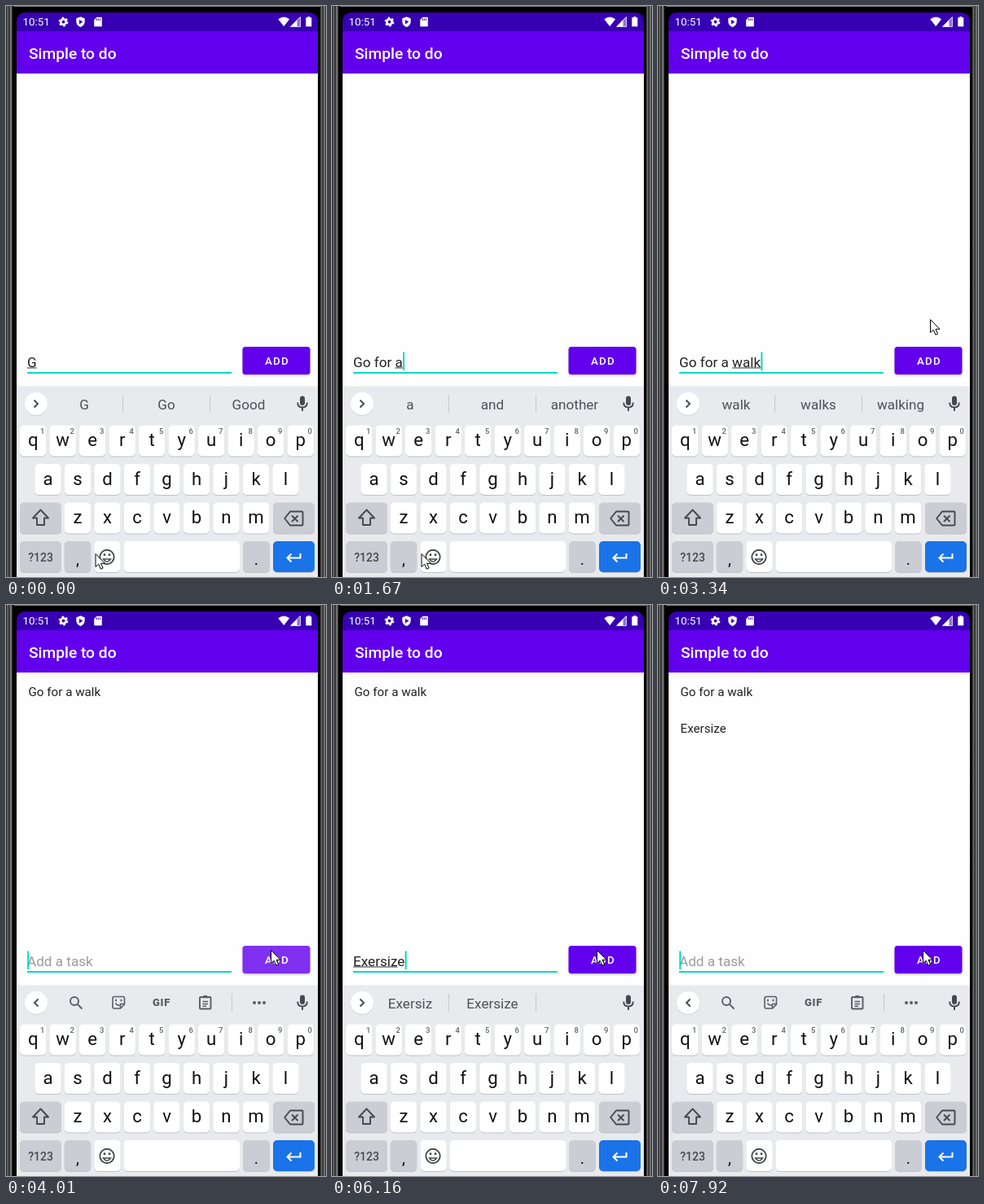
Recreate the animation shown at these times as an HTML page. Size 393 by 702 pixels, loop 8000 ms.

```html
<!DOCTYPE html>
<html lang="en">
<head>
<meta charset="utf-8">
<title>To-do list</title>
<style>
html, body { margin: 0; width: 100%; height: 100%; overflow: hidden; background: #000; }
svg { display: block; width: 100vw; height: 100vh; font-family: Roboto, sans-serif; }
text { white-space: pre; }
.icon { fill: none; stroke: #45494d; stroke-width: 1.9; }
.mid { text-anchor: middle; }
.tool { stroke: #5a5e63; }
</style>
</head>
<body>
<svg viewBox="0 0 393 702" preserveAspectRatio="none">
  <defs>
    <linearGradient id="rim">
      <stop offset="0" stop-color="#161616"/>
      <stop offset=".3" stop-color="#777"/>
      <stop offset=".45" stop-color="#1c1c1c"/>
      <stop offset=".75" stop-color="#8a8a8a"/>
      <stop offset="1" stop-color="#111"/>
    </linearGradient>
    <filter id="blur" x="-20%" y="-40%" width="140%" height="190%"><feGaussianBlur stdDeviation="1.6"/></filter>
  </defs>

  <rect width="393" height="702"/>
  <rect width="8" height="702" fill="url(#rim)"/>
  <rect x="385.5" width="7.5" height="702" fill="url(#rim)"/>
  <rect x="10" width="376" height="1" fill="#777"/>
  <path d="M13 83V20Q13 8 25 8H371Q383 8 383 20V83Z" fill="#3700b3"/>
  <rect x="13" y="31" width="370" height="52" fill="#6200ee"/>
  <rect x="13" y="83" width="370" height="385" fill="#fefefe"/>
  <rect x="13" y="467.5" width="370" height="235" fill="#e8eaed"/>

  <g fill="#fff">
    <text x="20.5" y="24.3" font-size="13.4">10:51</text>
    <circle cx="70.5" cy="19.5" r="3.2" fill="none" stroke="#fff" stroke-width="2.6"/>
    <circle cx="70.5" cy="19.5" r="5" fill="none" stroke="#fff" stroke-width="1.8" stroke-dasharray="2.6 2.636"/>
    <path d="M91.5 13.2l5.2 2v4q0 4.4-5.2 6.8q-5.200-2.400-5.200-6.800v-4z"/>
    <path d="M90 16.800v5.600l4.300-2.800z" fill="#3700b3"/>
    <path d="M111.500 13.700h5.500q.8 0 .8.8v10q0 .8-.8.800h-8q-.8 0-.8-.8v-7.500z"/>
    <path d="M111.500 15.500v2.300M113.500 15.500v2.300M115.500 15.500v2.300" stroke="#3700b3"/>
    <path d="M334.300 16.300q6.900-5.800 13.800 0L341.200 25z"/>
    <path d="M361 13.600v11.400h-11.400z" fill="#8c70d4"/>
    <path d="M357.500 17.100v7.900h-7.900z"/>
    <path d="M361.500 13.500v12h-12z" fill="none" stroke="#fff" stroke-width=".8"/>
    <path d="M370.300 13h3v1.300h2v11h-7v-11h2z"/>
    <text x="28" y="64.700" font-size="19.200" font-weight="500">Simple to do</text>
  </g>

  <g font-size="15.200" fill="#212121">
    <text x="27.500" y="112">Go for a walk</text>
    <text x="27.500" y="157.200">Exersize</text>
  </g>

  <g font-size="17.150">
    <text id="hint" x="26" y="443.500" fill="#9b9b9b">Add a task</text>
    <text id="field" x="26" y="443.500" fill="#212121"></text>
  </g>
  <rect id="under" y="444.400" height="1.100" fill="#444"/>
  <rect x="26" y="450" width="251" height="2" fill="#03dac5"/>
  <rect id="caret" y="425.500" width="2" height="22.500" fill="#03dac5"/>

  <rect id="shadow" x="291" width="82" height="34" rx="3" filter="url(#blur)"/>
  <rect id="button" x="290.500" y="419" width="83" height="34" rx="3.500"/>
  <text x="318" y="441" font-size="13.300" font-weight="500" letter-spacing="1.200" fill="#fff">ADD</text>

  <circle cx="37" cy="490" r="14" fill="#cfd2d6"/>
  <circle cx="37" cy="489" r="14" fill="#fff"/>
  <path id="chevron" class="icon"/>
  <g id="words" class="mid" font-size="17.100" fill="#4d5156">
    <text x="96" y="495.500"></text><text x="197" y="495.500"></text><text x="298" y="495.500"></text>
  </g>
  <path id="seps" d="M143.500 478v22M250.500 478v22" stroke="#c6c9cd"/>
  <g id="tools" class="icon tool">
    <circle cx="84" cy="487" r="5"/><path d="M87.800 490.800l5.700 5.700"/>
    <path d="M133 481.500h10.500q2 0 2 2v7.500l-5 5h-7.500q-2 0-2-2v-10.500q0-2 2-2zM145.500 490.500h-5v5.500M134.500 489.500q2 3.500 5 2.500" stroke-width="1.600"/>
    <path d="M135 484.800v2.400M141.500 484.800v2.400" />
    <text class="mid" x="191" y="493.300" font-size="13" font-weight="900" letter-spacing=".7" fill="#5a5e63" stroke="none">GIF</text>
    <rect x="238" y="482" width="13.500" height="14.500" rx="1"/>
    <path d="M241 482.500h7.500M241.500 487.500h6.500M241.500 490.500h6.500M241.500 493.300h4.500" stroke-width="1.400"/>
    <path d="M242.500 481.500h4.500" stroke-width="3"/>
    <path d="M277.500 478v22" stroke="#c6c9cd" stroke-width="1"/>
    <path d="M305 489h.01M311 489h.01M317 489h.01" stroke-width="4" stroke-linecap="round"/>
  </g>
  <rect x="361" y="479.500" width="6" height="11.500" rx="3" fill="#45494d"/>
  <path class="icon" d="M358.200 487.500q0 6 5.800 6t5.800-6M364 493.500v4.500" stroke-width="1.700"/>

  <g id="keys"></g>
  <path class="icon" d="M42.500 619.500l9.500 10h-5v8.500h-9v-8.500h-5z" stroke-linejoin="round"/>
  <path class="icon" d="M349 621.500h14.500q1 0 1 1v15q0 1-1 1H349l-6.800-8.500zM351 626.500l7.500 7.500M358.500 626.500l-7.500 7.500" stroke-linejoin="round"/>
  <g class="icon">
    <circle cx="124" cy="677.500" r="8.700"/>
    <path d="M119.500 680q4.500 6.500 9 0z" stroke-width="1.500"/>
    <path d="M121 674.800h.01M127 674.800h.01" stroke-width="2.900" stroke-linecap="round"/>
  </g>
  <path d="M361.500 673v5.500H346M350.500 673.500l-5 5 5 5" fill="none" stroke="#fff" stroke-width="2"/>

  <path id="pointer" d="M.5.500V16.500L4.200 13.200 6.800 19.200 9.600 18 7 12.200H12Z" fill="#fff" stroke="#000"/>
</svg>
<script>
const LOOP = 8000;
const $ = id => document.getElementById(id);
const field = $('field'), words = $('words').children;
const items = document.querySelectorAll('g[font-size="15.200"] text');

// Keyboard
let markup = '';
function key(x, y, w, fill = '#fff') {
  markup += `<rect x="${x}" y="${y + 1}" width="${w}" height="38" rx="5" fill="#bfc2c6"/>` +
            `<rect x="${x}" y="${y}" width="${w}" height="38" rx="5" fill="${fill}"/>`;
}
function label(str, x, y, size, fill = '#111', weight = 400) {
  markup += `<text class="mid" x="${x}" y="${y}" font-size="${size}" fill="${fill}" font-weight="${weight}">${str}</text>`;
}
const GREY = '#cacdd3', PITCH = 36.5;
[['qwertyuiop', 33.2, 515.5], ['asdfghjkl', 51.5, 563], ['zxcvbnm', 88, 610.5]].forEach(([row, x0, y], r) => {
  [...row].forEach((ch, i) => {
    const x = x0 + i * PITCH;
    key(x - 16.2, y, 32.4);
    label(ch, x, y + 25.8, 22.2);
    if (!r) label((i + 1) % 10, x + 11.6, y + 10.3, 9.5, '#5f6368', 500);
  });
});
key(17, 610.5, 51, GREY);
key(328, 610.5, 51, GREY);
key(17, 658, 51, GREY);
key(71.8, 658, 32.4, GREY);
key(108.3, 658, 32.4);
key(144.5, 658, 142.5);
key(291, 658, 32.8, GREY);
key(328, 658, 51, '#1a73e8');
label('?123', 42.5, 682.8, 14, '#45494d', 500);
label(',', 88, 686.5, 20);
label('.', 307.5, 686.5, 20);
$('keys').innerHTML = markup;

// Each step changes only what it names.
// text: field, u: underlined range, s: suggestions (null = toolbar), p: pointer
const STEPS = [
  [0, { text: 'G', u: [0, 1], caret: 0, s: ['G', 'Go', 'Good'], seps: 1, p: [109.5, 673], press: 0, list: [0, 0], open: 1 }],
  [120, { text: 'Go', caret: 1 }],
  [390, { u: [0, 2], s: ['Go', 'Going', 'Got'] }],
  [640, { text: 'Go ', u: [0, 0], s: ['to', 'for', 'back'] }],
  [760, { text: 'Go fo', u: [3, 4] }],
  [880, { text: 'Go for', u: [3, 5], s: ['fo', 'for', 'to'] }],
  [1190, { u: [3, 6], s: ['for', 'four', 'form'] }],
  [1310, { text: 'Go for ', u: [0, 0] }],
  [1430, { s: ['the', 'a', 'it'] }],
  [1550, { text: 'Go for a' }],
  [1670, { u: [7, 8], s: ['a', 'and', 'another'] }],
  [1820, { text: 'Go for a ', u: [0, 0], s: ['few', 'walk', 'ride'] }],
  [2070, { text: 'Go for a w' }],
  [2190, { text: 'Go for a wal', u: [9, 11], s: ['wa', 'was', 'way'] }],
  [2310, { text: 'Go for a walk', u: [9, 12], s: ['wal', 'walk', 'wall'] }],
  [2560, { u: [9, 13], s: ['walk', 'walks', 'walking'] }],
  [2960, { caret: 0, p: [190, 570] }],
  [3080, { p: [296, 410] }],
  [3200, { caret: 1, p: [331, 357] }],
  [3340, { p: [334, 385] }],
  [3470, { p: [326, 420] }],
  [3620, { caret: 0, p: [325, 424] }],
  [3870, { text: '', u: [0, 0], caret: 1, press: 2 }],
  [4010, { s: null, press: 1, list: [1, 0] }],
  [4130, { press: 0 }],
  [4380, { caret: 0 }],
  [4880, { text: 'E', caret: 1 }],
  [5160, { text: 'Ex', u: [0, 1], s: ['E', 'Ex', 'Even'] }],
  [5280, { text: 'Exe', u: [0, 2], s: ['Ex', 'Exam', 'Extra'] }],
  [5400, { text: 'Exer', u: [0, 3], s: ['Exe', 'Exersize', 'Exercise'] }],
  [5520, { text: 'Exers', u: [0, 4], s: ['Exer', 'Exersize', 'Exercise'] }],
  [5640, { s: ['Exers', 'Exersize', 'Exercise'] }],
  [5890, { text: 'Exersi', u: [0, 5], s: ['Exers', 'Exersize', ''] }],
  [6040, { text: 'Exersiz', u: [0, 6], s: ['Exersi', 'Exersize', ''] }],
  [6160, { text: 'Exersize', u: [0, 7], s: ['Exersiz', 'Exersize', ''] }],
  [6410, { u: [0, 8], s: ['', 'Exersize', ''], seps: 0 }],
  [6840, { text: '', u: [0, 0], press: 2 }],
  [6960, { s: null, press: 1, list: [1, .9] }],
  [7110, { press: 0, list: [1, 1] }],
  [7360, { caret: 0 }],
  [7920, { caret: 1 }]
];

const FILLS = ['#6200ee', '#7f30f0', '#893ff1'];
const set = (el, attrs) => { for (const k in attrs) el.setAttribute(k, attrs[k]); };
const show = (id, on) => set($(id), { visibility: on ? 'visible' : 'hidden' });
const widthTo = n => n ? field.getSubStringLength(0, n) : 0;

function draw(t) {
  const v = {};
  for (const [at, change] of STEPS) if (at <= t) Object.assign(v, change);

  field.textContent = v.text;
  show('hint', !v.text);
  const from = widthTo(v.u[0]);
  set($('under'), { x: 26 + from, width: widthTo(v.u[1]) - from });
  set($('caret'), { x: 26.2 + widthTo(v.text.length) });
  show('caret', v.caret);

  [...words].forEach((w, i) => { w.textContent = v.s ? v.s[i] : ''; });
  show('seps', v.s && v.seps);
  show('tools', !v.s);
  set($('chevron'), { d: v.s ? 'M34.500 484.500l4.500 4.500-4.500 4.500' : 'M39.500 484.500l-4.500 4.500 4.500 4.500' });

  set($('button'), { fill: FILLS[v.press] });
  set($('shadow'), v.press === 2 ? { y: 422, opacity: .45 } : { y: 420, opacity: .3 });
  items.forEach((el, i) => set(el, { opacity: v.list[i] }));
  set($('pointer'), { transform: `translate(${v.p})` });
}

const start = performance.now();
let last = -1;
function tick() {
  const t = (performance.now() - start) % LOOP;
  const step = STEPS.filter(s => s[0] <= t).length;
  if (step !== last) { draw(t); last = step; }
  requestAnimationFrame(tick);
}
tick();
</script>
</body>
</html>
```
